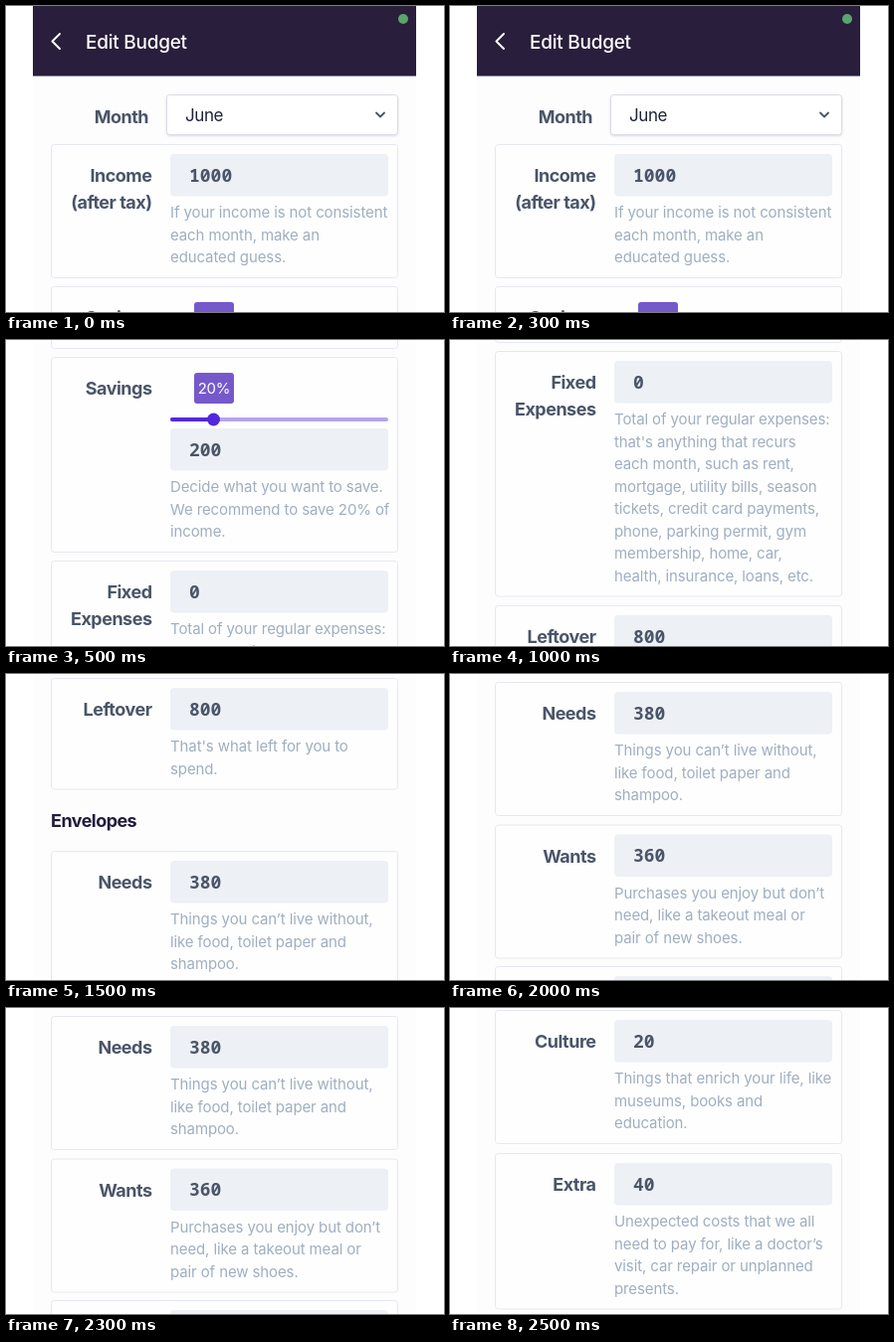
Write an HTML page that moves like this. It is 440 by 308 pixels and loops after 3 s.

```html
<!DOCTYPE html>
<html lang="en">
<head>
<meta charset="utf-8">
<title>Edit Budget</title>
<style>
  html, body { margin: 0; width: 100%; height: 100%; overflow: hidden; background: #fff; }
  svg { display: block; width: 440px; height: 308px; }
  text { font-family: Inter, sans-serif; }
  .title { font-size: 19px; font-weight: 500; letter-spacing: -.25px; fill: #fff; }
  .label { font-size: 18px; font-weight: 700; letter-spacing: -.5px; fill: #4a5568; text-anchor: end; }
  .heading { font-size: 18px; font-weight: 700; letter-spacing: -.55px; fill: #211c3d; }
  .month { font-size: 17px; letter-spacing: -.4px; fill: #1d2433; }
  .value { font: 600 18px "Noto Sans Mono", monospace; fill: #4a5568; }
  .hint { font-size: 15px; letter-spacing: -.11px; fill: #a0aec0; }
  .badge { font-size: 15px; letter-spacing: -.2px; fill: #fff; text-anchor: middle; }
  .card { fill: #fefefe; stroke: #e6e8ef; }
  .input { fill: #edf0f5; }
  .select { fill: #fff; stroke: #d9dce5; filter: drop-shadow(0 1px 1px #0002); }
  .chevron { fill: none; stroke-linecap: round; stroke-linejoin: round; }
</style>
</head>
<body>
<svg viewBox="0 0 440 308">
  <rect x="27" width="385" height="308" fill="#fdfdfd"/>
  <g id="page"></g>
</svg>
<script>
const CYCLE = 3000, HOLD = 500;
const SCROLL = [0, 265, 476, 739, 909, 1201];
const page = document.getElementById("page");

const text = (cls, x, y, str) => `<text class="${cls}" x="${x}" y="${y}">${str}</text>`;
const box = (cls, x, y, w, h, r) =>
  `<rect class="${cls}" x="${x}" y="${y}" width="${w}" height="${h}" rx="${r}"/>`;

const header = () => `
  <rect x="27" width="385" height="70" fill="#291e3c"/>
  <rect x="27" y="70" width="385" height="1" fill="#8f8999"/>
  <path class="chevron" d="M54 28l-7.5 7.5 7.5 7.5" stroke="#fff" stroke-width="2"/>
  ${text("title", 80, 42.5, "Edit Budget")}
  <circle cx="399" cy="13" r="5" fill="#5ba56c"/>
  ${text("label", 143, 118, "Month")}
  ${box("select", 161.5, 89.5, 232, 40, 3)}
  ${text("month", 180, 116, "June")}
  <path class="chevron" d="M372 107.5l4 4 4-4" stroke="#4a5568" stroke-width="1.8"/>`;

const slider = y => `
  <rect x="189" y="${y + 15.5}" width="40" height="31" rx="3" fill="#7559cb"/>
  ${text("badge", 209, y + 36.5, "20%")}
  <rect x="165" y="${y + 60.5}" width="219" height="4" rx="2" fill="#b5a5ec"/>
  <rect x="165" y="${y + 60.5}" width="44" height="4" rx="2" fill="#5328dc"/>
  <circle cx="208.5" cy="${y + 62.5}" r="6.5" fill="#5328dc"/>`;

function card(top, labels, value, hints, hasSlider) {
  const y = top + (hasSlider ? 62 : 0);
  const height = y - top + 66.5 + 22.5 * hints.length;
  return box("card", 45.5, top, 348, height, 3)
    + (hasSlider ? slider(top) : "")
    + labels.map((s, i) => text("label", 146.5, top + 37.7 + 26.5 * i, s)).join("")
    + box("input", 165, y + 9.5, 219, 42.5, 4)
    + text("value", 184, y + 37, value)
    + hints.map((s, i) => text("hint", 165, y + 73.7 + 22.5 * i, s)).join("");
}

page.innerHTML = header()
  + card(139.5, ["Income", "(after tax)"], 1000,
      ["If your income is not consistent", "each month, make an", "educated guess."])
  + card(282.5, ["Savings"], 200,
      ["Decide what you want to save.", "We recommend to save 20% of", "income."], true)
  + card(487.5, ["Fixed", "Expenses"], 0,
      ["Total of your regular expenses:", "that's anything that recurs", "each month, such as rent,",
       "mortgage, utility bills, season", "tickets, credit card payments,", "phone, parking permit, gym",
       "membership, home, car,", "health, insurance, loans, etc."])
  + card(743.5, ["Leftover"], 800, ["That's what left for you to", "spend."])
  + text("heading", 45, 892.5, "Envelopes")
  + card(917.5, ["Needs"], 380,
      ["Things you can’t live without,", "like food, toilet paper and", "shampoo."])
  + card(1061, ["Wants"], 360,
      ["Purchases you enjoy but don’t", "need, like a takeout meal or", "pair of new shoes."])
  + card(1203.5, ["Culture"], 20,
      ["Things that enrich your life, like", "museums, books and", "education."])
  + card(1347.5, ["Extra"], 40,
      ["Unexpected costs that we all", "need to pay for, like a doctor’s", "visit, car repair or unplanned", "presents."]);

function draw() {
  const step = Math.floor(performance.now() % CYCLE / HOLD);
  page.setAttribute("transform", `translate(0 ${-SCROLL[step]})`);
  requestAnimationFrame(draw);
}
draw();
</script>
</body>
</html>
```
